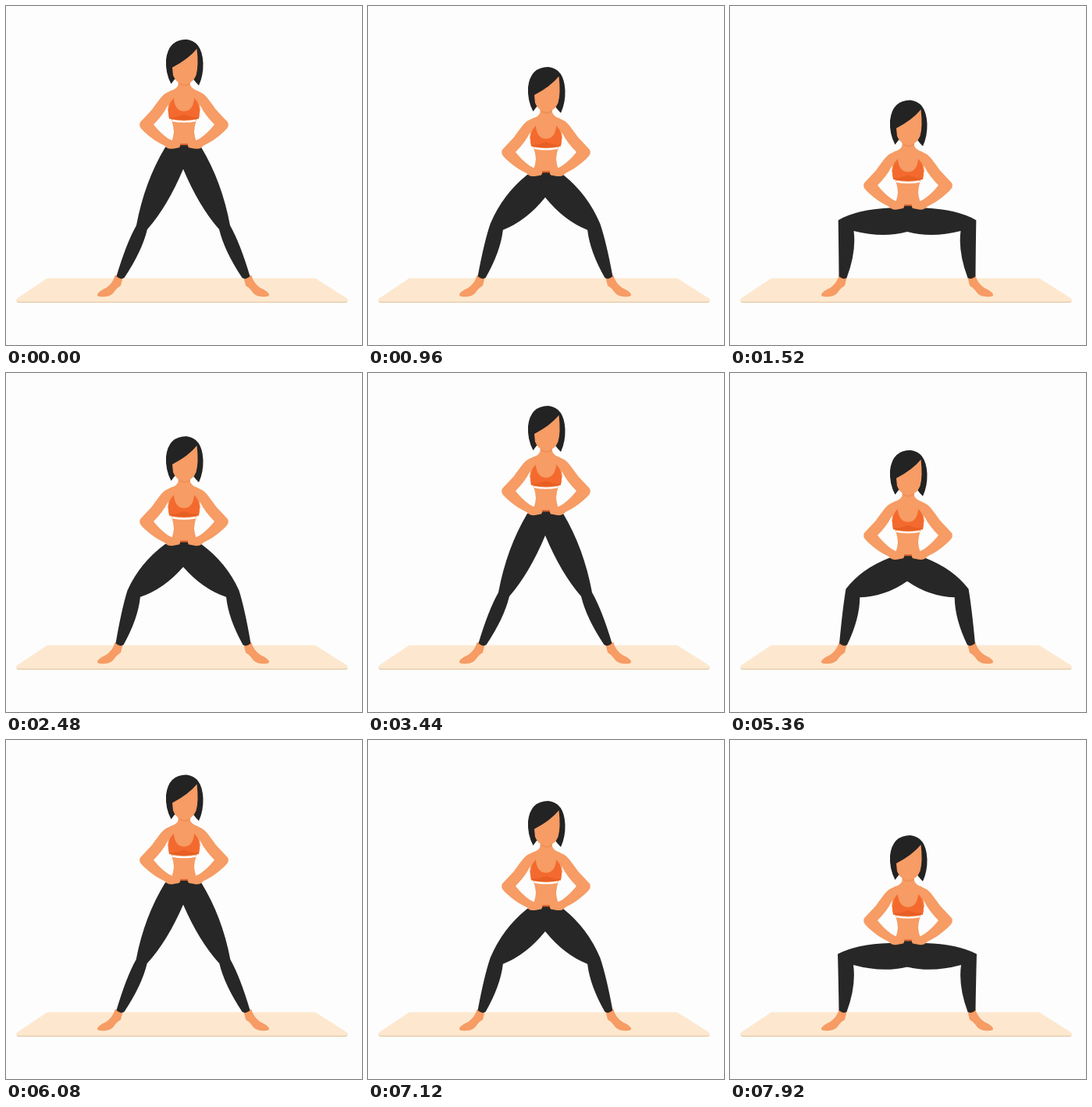
Animation of 456x434 px, one loop 8 s. Source, as an HTML page:

```html
<!DOCTYPE html>
<html lang="en">
<head>
<meta charset="utf-8">
<title>Wide squat</title>
<style>
  html, body { margin: 0; width: 100%; height: 100%; overflow: hidden; background: #fdfdfd; }
  svg { display: block; width: 456px; height: 434px; }
  .skin { fill: #f69c64; }
  .hair { fill: #232324; }
  .pants { fill: #272727; }
</style>
</head>
<body>
<svg viewBox="0 0 456 434">
  <defs>
    <path id="foot" class="skin" d="M139.500 345L150 346Q148 354 147 358Q142 361 140 364Q135 372 127 372Q116 373 117 369Q119 365 128 361Q137 355 139.500 345Z"/>
    <path id="arm" class="skin" d="M219 105C214 108 208 108 203 112C198 116 192 125 187 132L172 148Q170 152 173 156C182 166 194 174 203 178Q207 183 214 182L222 180.500Q225 176 221 174L212 171C205 168 196 160 189 151Q201 139 207 127L219 112Z"/>
    <path id="leg" class="pants"/>
  </defs>

  <path d="M53 349H396L437 375Q439 380 434 380H17Q12 380 14 375Z" fill="#e6cfb1"/>
  <path d="M53 348.500H396L437 374.500Q439 378.500 434 378.500H17Q12 378.500 14 374.500Z" fill="#fde8cf"/>

  <use href="#foot"/>
  <use href="#foot" transform="matrix(-1 0 0 1 454 0)"/>
  <g id="torso">
    <path class="hair" d="M211.500 99Q204 85 205 68Q208 42 231 42Q251 44 252.500 72Q253 88 247 101Q243 97 240 93H216Z"/>
    <path class="skin" d="M220.500 90H236V100Q237 105 246 108L249 133Q242 146 241 160Q242 172 248 181H208Q214 172 215 160Q214 146 207 133L210 108Q220 105 220.500 100Z"/>
    <path d="M221.500 97Q229 103 236 97V99Q229 104.500 221.500 99Z" fill="#ee8f57"/>
    <path class="skin" d="M213 78Q234 67 244.500 54Q247 76 243.500 88Q239 99 229 99Q218 99 214 88Z"/>
    <path d="M212.500 109H214.500Q214 134 228 134Q242 134 241.500 109H243.500Q244 120 247 127Q249 137 247 143Q228 147 209 143Q207 137 209 127Q212 120 212.500 109Z" fill="#f46a2e"/>
    <path d="M209 142Q219 142 228 138Q237 142 247 142V143.500Q228 147.500 209 143.500Z" fill="#e85f24"/>
    <path d="M213 146Q228 149 243 146" fill="none" stroke="#fff" stroke-width="2.200"/>
  </g>
  <use href="#leg"/>
  <use href="#leg" transform="matrix(-1 0 0 1 454 0)"/>
  <g id="arms">
    <path class="pants" d="M219 177H237V184H219Z"/>
    <path d="M223 175.500H233V177.500H223Z" fill="#d9602f"/>
    <use href="#arm"/>
    <use href="#arm" transform="matrix(-1 0 0 1 456 0)"/>
  </g>
</svg>
<script>
const LOOP = 8000, STEP = 80;
const REP = 3080, DOWN = 1000, UP = 1380, LEAD = 780, DEPTH = 80;

const $ = id => document.getElementById(id);
const leg = $("leg"), torso = $("torso"), arms = $("arms");
const mix = (a, b, k) => a + (b - a) * k;

// Quick drop that settles, slow smooth rise, then a rest standing
function squat(ms) {
  const t = (ms + REP - LEAD) % REP;
  if (t < DOWN) return 1 - (1 - t / DOWN) ** 3;
  return (1 + Math.cos(Math.PI * Math.min(1, (t - DOWN) / UP))) / 2;
}

// Curve from p to q, its control point offset from the middle
const bend = ([px, py], [qx, qy], dx, dy) =>
  `Q${(px + qx) / 2 + dx} ${(py + qy) / 2 + dy} ${qx} ${qy}`;

function draw(ms) {
  const s = squat(ms), drop = DEPTH * s, k = s ** 1.3;
  const hip = [204, 180 + drop];
  const crotch = [227, 208 + drop * 1.03];
  const knee = [mix(167, 138, k), mix(281, 274, k)];
  const kneeIn = [mix(181, 158, k), mix(286, 288, k)];
  const ankle = [mix(141.5, 139.5, s), 346];
  const ankleIn = [ankle[0] + 10, 348];
  leg.setAttribute("d",
    `M228 ${hip[1] - 1}L${hip}` + bend(hip, knee, -8, -6) + bend(knee, ankle, 0, -10) +
    bend(ankle, ankleIn, 0, 4) + bend(ankleIn, kneeIn, 8, -3) +
    bend(kneeIn, crotch, 3, 9) + "h1Z");
  for (const part of [torso, arms]) part.setAttribute("transform", `translate(0 ${drop})`);
}

const start = performance.now();
function tick() {
  const t = (performance.now() - start) % LOOP;
  draw(Math.floor(t / STEP) * STEP);
  requestAnimationFrame(tick);
}
tick();
</script>
</body>
</html>
```
